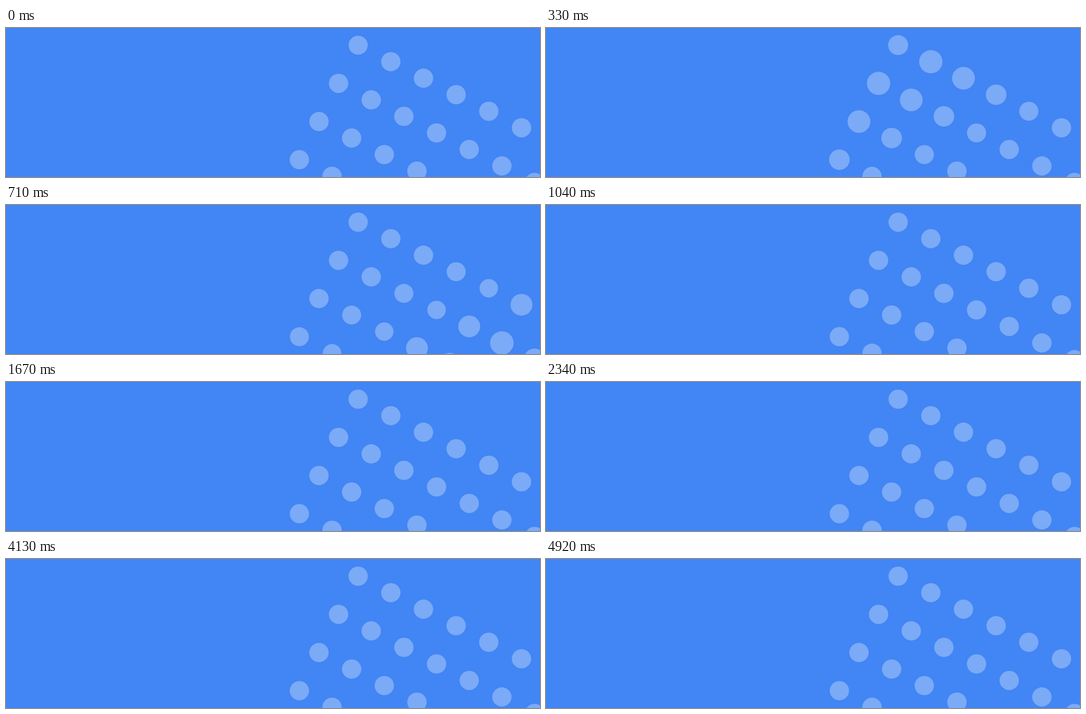
Animation, 960 px wide and 270 px high, one loop 4960 ms. Source, as an HTML page:

```html
<!DOCTYPE html>
<html lang="en">
<head>
<meta charset="utf-8">
<title>Dot wave</title>
<style>
  html, body { margin: 0; width: 100%; height: 100%; overflow: hidden; background: #4285f4; }
  svg { display: block; width: 960px; height: 270px; }
  circle { fill: #7baaf7; }
</style>
</head>
<body>
<svg id="stage" viewBox="0 0 960 270"></svg>
<script>
  const LOOP = 4960;
  const STEP = 1000 / 24;
  const REST = 17.4;
  const DELAY = 2; // steps between neighbouring diagonals

  // Radius of one pulse, step by step: swell, overshoot back, settle.
  const PULSE = [17.2, 17.6, 18.5, 19.6, 20.5, 21.2, 21, 19.7, 18, 16.6, 16.7, 17.1];

  const stage = document.getElementById('stage');
  const dots = [];

  function addDot(col, row) {
    const circle = document.createElementNS('http://www.w3.org/2000/svg', 'circle');
    circle.setAttribute('cx', 633.1 + col * 58.72 - row * 35.23);
    circle.setAttribute('cy', 31.1 + col * 29.94 + row * 69.2);
    stage.append(circle);
    dots.push({ circle, delay: (col + row) * DELAY });
  }

  for (let row = 0; row < 4; row++) {
    for (let col = 0; col < 7; col++) addDot(col, row);
  }

  function draw(time) {
    const tick = Math.floor((time % LOOP) / 10) * 10;
    const step = Math.floor((tick + 4.9) / STEP);
    for (const { circle, delay } of dots) {
      circle.setAttribute('r', PULSE[step - delay] ?? REST);
    }
  }

  const start = performance.now();
  function run() {
    draw(performance.now() - start);
    requestAnimationFrame(run);
  }
  run();
</script>
</body>
</html>
```
